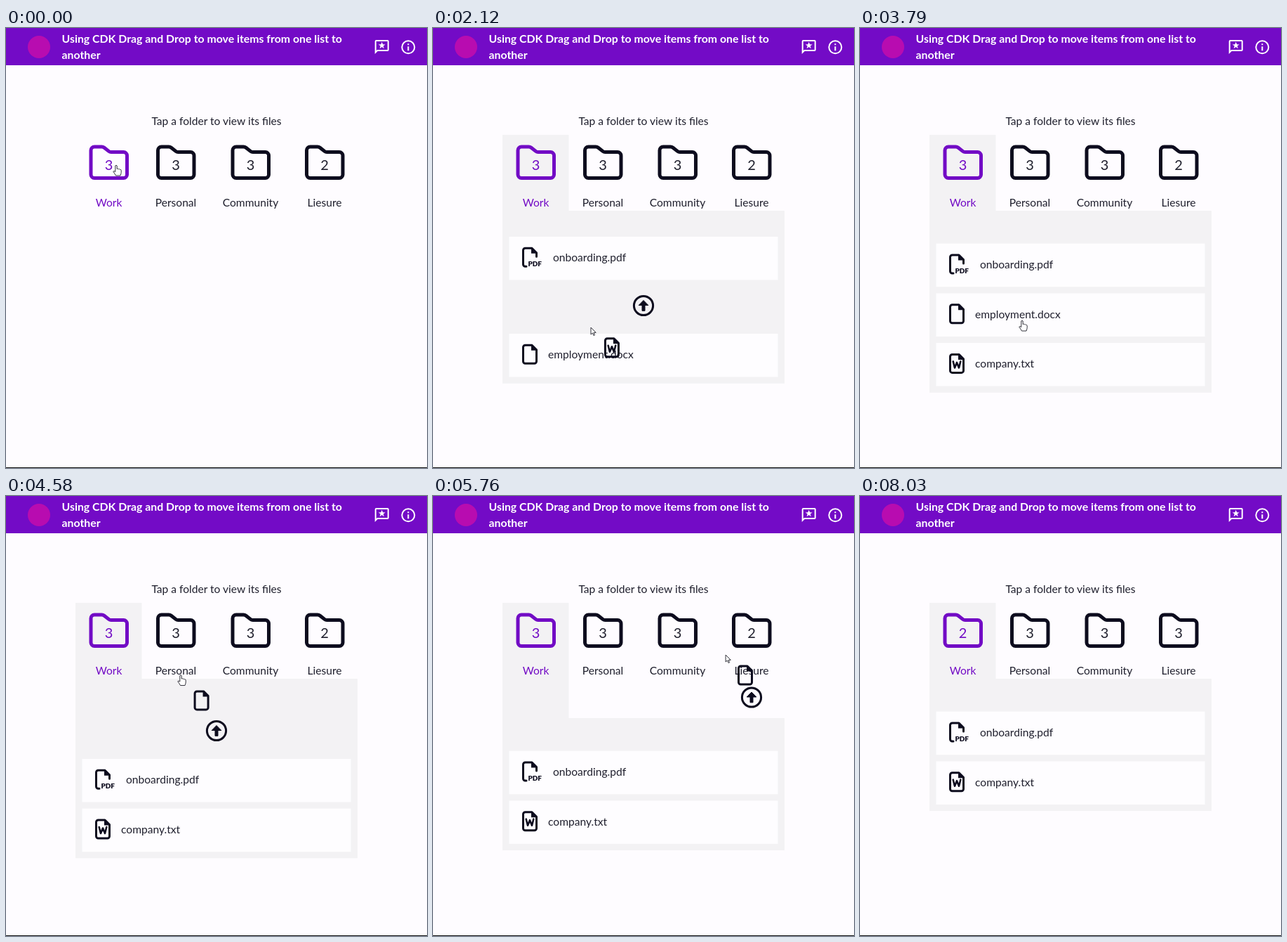
Write an HTML page that moves like this. It is 600 px wide and 626 px high and loops after 8.51 s.

```html
<!DOCTYPE html>
<html lang="en">
<head>
<meta charset="utf-8">
<title>Drag and drop between lists</title>
<style>
  html, body { margin: 0; width: 100%; height: 100%; overflow: hidden; background: #fefcff; }
  svg { display: block; width: 600px; height: 626px; font: 15.6px Lato, "Open Sans", sans-serif; }
  .ink { fill: #20202e; }
  .line { fill: none; stroke: #0d0c1e; stroke-width: 3; stroke-linecap: round; stroke-linejoin: round; }
  .solid { fill: #0d0c1e; }
  .mid { text-anchor: middle; }
  .title { font-size: 15.85px; font-weight: 700; fill: #fff; }
  .count { font-size: 20px; }
  .pdf { font-size: 10px; font-weight: 900; }
  .outline { fill: none; stroke: #0d0c1e; stroke-width: 5; stroke-linejoin: round; }
  .active .outline { stroke: #720bc5; }
  .active .ink { fill: #720bc5; }
  .pointer { fill: #fff; stroke: #33333c; stroke-width: 1; stroke-linejoin: round; }
</style>
</head>
<body>
<svg viewBox="0 0 600 626">
  <defs>
    <g id="sheet">
      <path class="line" d="M3-13H-6.5a3 3 0 0 0-3 3V10a3 3 0 0 0 3 3H6.5a3 3 0 0 0 3-3V-6.5Z"/>
      <path class="solid" d="M2-13V-5.5H9.5Z"/>
    </g>
    <g id="docx"><use href="#sheet"/></g>
    <g id="txt">
      <use href="#sheet"/>
      <path class="line" style="stroke-width:2.6" d="M-5.3-3L-3 6 0-1.5 3 6 5.3-3"/>
    </g>
    <g id="pdf">
      <path class="line" d="M-5 13H-6.5a3 3 0 0 1-3-3V-10a3 3 0 0 1 3-3H3L9.5-6.5V-1"/>
      <path class="solid" d="M2-13V-5.5H9.5Z"/>
      <text class="solid mid pdf" x="7.2" y="12.8">PDF</text>
    </g>
    <path id="folder" d="M-20.5-22H-10q2 0 3.5 1.2L0-15.6q1.4 1.1 3.2 1.1H21a5 5 0 0 1 5 5V17.5a5 5 0 0 1-5 5H-20.5a5 5 0 0 1-5-5V-17a5 5 0 0 1 5-5Z"/>
  </defs>

  <rect width="600" height="626" fill="#fefcff"/>
  <rect y="625" width="600" height="1" fill="#111"/>
  <rect width="600" height="53" fill="#730bc6"/>
  <circle cx="47" cy="27" r="16" fill="#b80cb0"/>
  <text class="title" x="79.5" y="21">Using CDK Drag and Drop to move items from one list to</text>
  <text class="title" x="79.5" y="44">another</text>
  <g fill="#fff" transform="translate(523.7 15)">
    <path fill-rule="evenodd" d="M20 2H4a2 2 0 0 0-2 2V22L6 18H20a2 2 0 0 0 2-2V4a2 2 0 0 0-2-2ZM20 16H5.2L4 17.2V4H20Z"/>
    <path d="M12 4.8l1.3 3.5 3.7.1-3 2.2 1.1 3.6L12 12l-3.1 2.2L10 10.6 7 8.4l3.7-.1Z"/>
  </g>
  <g fill="none" stroke="#fff" stroke-width="2">
    <circle cx="573.3" cy="27.3" r="9"/>
    <path d="M573.3 22.3v2M573.3 26.3v6"/>
  </g>
  <text class="ink mid" x="300" y="138">Tap a folder to view its files</text>

  <g id="panel" fill="#f3f2f4">
    <rect id="tab" x="99" y="152" width="94.5"/>
    <rect id="body" x="99" width="402"/>
  </g>
  <g id="folders"></g>
  <g id="rows"></g>
  <g id="hole">
    <circle class="line" r="13.6"/>
    <path class="solid" stroke="#0d0c1e" stroke-linejoin="round" d="M0-7.5L6.8-.5H2V7.3H-2V-.5H-6.8Z"/>
  </g>
  <use id="preview"/>
  <path id="arrow" class="pointer" d="M0 0V10L2.4 7.9 4 11.5 5.5 10.8 4 7.3H7.2Z"/>
  <path id="hand" class="pointer" d="M-1.2 1Q0-.6 1.2 1V5.5Q2.5 4.6 3.4 5.8 4.7 5 5.4 6.4 7 5.8 7.2 7.6V10.5Q7 12.5 6 15H-.5Q-1.8 12.5-4.2 9.2-3.6 7.6-1.2 9.5Z"/>
</svg>
<script>
const LOOP = 8510, ROW_H = 61.5, PITCH = 70.7;
const LAG = 15; // the dragged icon trails the pointer a little
const $ = id => document.getElementById(id);

const folders = [["Work", 146.5, 29], ["Personal", 242, 29], ["Community", 348.5, 39], ["Liesure", 454, 29]]
  .map(([name, x, half]) => ({ name, x, half }));
const files = {
  txt: { name: "company.txt", x: 164 },
  pdf: { name: "onboarding.pdf", x: 171 },
  docx: { name: "employment.docx", x: 164 }
};

// hole: slot in the open list; over: folder holding the placeholder
const states = [
  { t: 0, list: null },
  { t: 90, list: ["txt", "pdf", "docx"] },
  { t: 1050, list: ["pdf", "docx"], drag: "txt", hole: 0 },
  { t: 1500, list: ["pdf", "docx"], drag: "txt", hole: 1 },
  { t: 2300, list: ["pdf", "docx"], drag: "txt", hole: 2 },
  { t: 2860, list: ["pdf", "docx", "txt"] },
  { t: 3860, list: ["pdf", "txt"], drag: "docx", hole: 1 },
  { t: 4300, list: ["pdf", "txt"], drag: "docx", hole: 0 },
  { t: 4640, list: ["pdf", "txt"], drag: "docx", over: 1 },
  { t: 5180, list: ["pdf", "txt"], drag: "docx", over: 2 },
  { t: 5700, list: ["pdf", "txt"], drag: "docx", over: 3 },
  { t: 6480, list: ["pdf", "txt"], done: true }
];

// pointer path: time, x, y
const path = [
  [0, 157, 195], [120, 157, 195], [780, 222, 336], [980, 222, 336], [1500, 223, 385],
  [1760, 224, 410], [2120, 225, 426], [2550, 228, 452], [2860, 228, 455], [3270, 231, 440],
  [3610, 231, 440], [3780, 231, 416], [3850, 231, 416], [4450, 246, 283], [4520, 247, 278],
  [4580, 249, 255], [4730, 252, 182], [5000, 252, 182], [5360, 344, 212], [5520, 344, 212],
  [5760, 417, 226], [6330, 427, 233], [6850, 427, 233], [7180, 604, 400]
];

function slope(i, k) {
  const a = path[i - 1], b = path[i], c = path[i + 1];
  if (!a || !c || (b[k] - a[k]) * (c[k] - b[k]) <= 0) return 0;
  return (c[k] - a[k]) / (c[0] - a[0]);
}

function pointerAt(t) {
  const j = path.findIndex(p => p[0] > t);
  if (j < 0) return null;
  const a = path[j - 1], b = path[j], d = b[0] - a[0], u = (t - a[0]) / d, v = 1 - u;
  return [1, 2].map(k =>
    v * v * (1 + 2 * u) * a[k] + u * u * (3 - 2 * u) * b[k] +
    d * u * v * (v * slope(j - 1, k) - u * slope(j, k)));
}

function layout({ list, hole, over }) {
  const inList = hole !== undefined, inFolder = over !== undefined;
  const top = inFolder ? 316 : 260;
  const first = inList && hole > 0 ? top + 37 : top + 46.7;
  const rows = list.map((_, i) => first + PITCH * i + (inList && i >= hole ? 67.3 : 0));
  const bottom = first + PITCH * list.length + (inList ? 67.3 : 0);
  const mark = inList ? [300, first + PITCH * hole + 27.3] : inFolder ? [folders[over].x, 286.5] : null;
  return { top, rows, bottom, mark };
}

const place = (el, p) => {
  el.style.display = p ? "" : "none";
  if (p) el.setAttribute("transform", `translate(${p[0].toFixed(2)} ${p[1].toFixed(2)})`);
};

$("folders").innerHTML = folders.map((f, i) => `
  <g class="${i ? "" : "active"}" transform="translate(${f.x} 191)">
    <use class="outline" href="#folder"/>
    <text class="ink mid count" y="11.2"></text>
    <text class="ink mid" y="62.5">${f.name}</text>
  </g>`).join("");
$("rows").innerHTML = Object.entries(files).map(([id, f]) => `
  <g id="row-${id}">
    <rect x="108.5" width="383" height="${ROW_H}" fill="#fefdff"/>
    <use href="#${id}" transform="translate(138 29.3)"/>
    <text class="ink" x="${f.x}" y="35.3">${f.name}</text>
  </g>`).join("");
const counts = document.querySelectorAll(".count");

function overTarget([x, y], rows) {
  const onFolder = y > 165 && y < 262 && folders.some(f => Math.abs(x - f.x) < f.half);
  return onFolder || x > 108 && x < 492 && rows.some(r => y >= r && y <= r + ROW_H);
}

function draw(t) {
  const s = states.findLast(s => s.t <= t);
  const box = s.list && layout(s);
  $("panel").style.display = box ? "" : "none";
  if (box) {
    $("tab").setAttribute("height", box.top - 152 + 1);
    $("body").setAttribute("y", box.top);
    $("body").setAttribute("height", box.bottom - box.top);
  }
  for (const id in files) {
    const i = box ? s.list.indexOf(id) : -1;
    place($("row-" + id), i < 0 ? null : [0, box.rows[i]]);
  }
  place($("hole"), box && box.mark);
  (s.done ? [2, 3, 3, 3] : [3, 3, 3, 2]).forEach((n, i) => counts[i].textContent = n);

  const p = pointerAt(t), hand = p && overTarget(p, box ? box.rows : []);
  place($("hand"), hand ? p : null);
  place($("arrow"), hand ? null : p);
  const trail = s.drag && pointerAt(t - LAG);
  if (trail) $("preview").setAttribute("href", "#" + s.drag);
  place($("preview"), trail ? [trail[0] + 30, trail[1] + 29.5] : null);
}

const start = performance.now();
(function tick() {
  draw((performance.now() - start) % LOOP);
  requestAnimationFrame(tick);
})();
</script>
</body>
</html>
```
